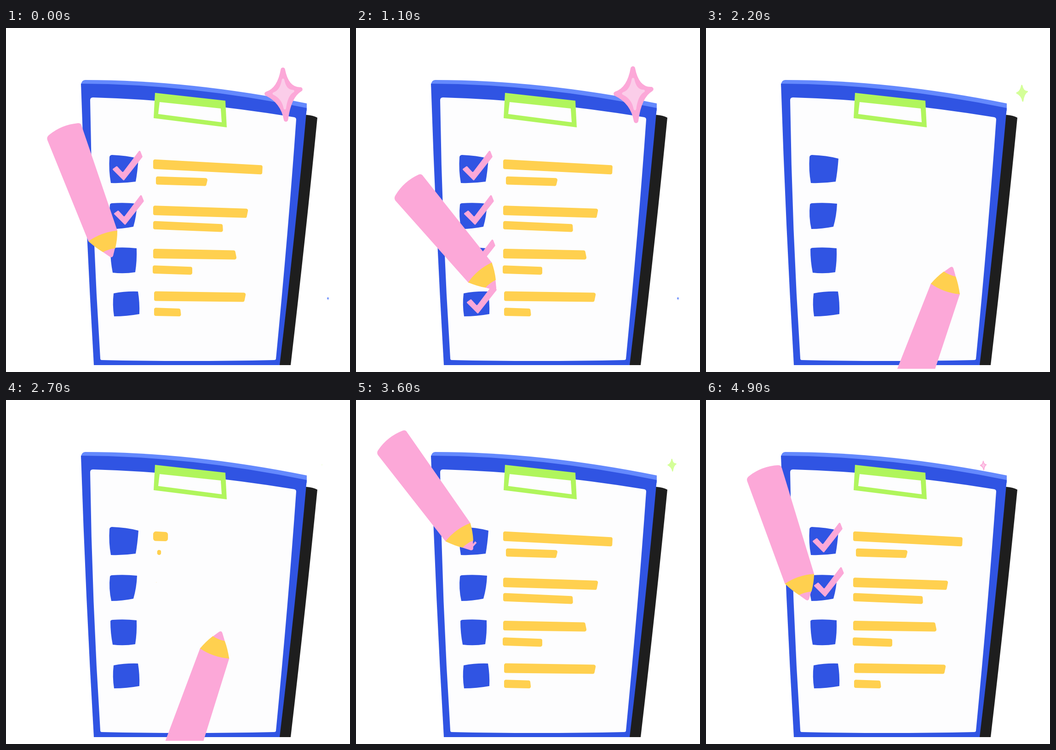
Animation, 748 px wide and 748 px high, one loop 5000 ms. Source, as an HTML page with a canvas:

```html
<!DOCTYPE html>
<html lang="en">
<head>
<meta charset="utf-8">
<title>Checklist</title>
<style>
html, body { margin: 0; width: 100%; height: 100%; overflow: hidden; background: #fff; }
canvas { display: block; width: 748px; height: 748px; }
</style>
</head>
<body>
<canvas id="stage" width="748" height="748"></canvas>
<script>
const ctx = document.getElementById('stage').getContext('2d');
const BLUE = '#3054e3', SKY = '#6489fd', PINK = '#fca8d8', PALE = '#fbcde9',
      YELLOW = '#ffd04f', LIME = '#b0f55c', MINT = '#d4ff98', INK = '#1e1e1e', PAPER = '#fdfdfe';
const LOOP = 5000, STEP = 100, ROWS = 4;

const clamp = u => Math.max(0, Math.min(1, u));
const mix = (a, b, u) => a + (b - a) * u;
const mixAll = (a, b, u) => a.map((v, i) => mix(v, b[i], u));
const smooth = u => (u = clamp(u), u * u * (3 - 2 * u));
const quint = u => u < 0.5 ? 16 * u ** 5 : 1 - 16 * (1 - u) ** 5;
const backIn = u => (u = clamp(u), u * u * (2.8 * u - 1.8));

function fill(d, color, rule) {
  ctx.fillStyle = color;
  ctx.fill(new Path2D(d), rule || 'nonzero');
}

function rounded(pts, r) {
  const p = new Path2D(), n = pts.length, last = pts[n - 1];
  p.moveTo((last[0] + pts[0][0]) / 2, (last[1] + pts[0][1]) / 2);
  pts.forEach((a, i) => p.arcTo(...a, ...pts[(i + 1) % n], r));
  p.closePath();
  return p;
}

function drawBoard() {
  fill('M640 187 L654 189 Q668 190 677 195 Q653 440 619 733 H580Z', INK);
  fill('M163 123 Q165 113 172 113 Q400 113 654 164 V180 L164 130Z', SKY);
  fill('M163 121 Q400 122 654 174 Q630 440 595 733 H191 Q173 427 163 121Z', BLUE);
  fill('M183 157 Q183 151 189 151 Q400 157 627 194 Q631 195 631 199 Q614 440 587 719 ' +
       'Q587 722 583 722 Q390 726 208 722 Q205 722 205 718 Q187 438 183 157Z', PAPER);
  fill('M324 141 L477 158 L480 216 L321 196Z', LIME);
  fill('M334 161 L331 187 L469 205 L467 175Z', PAPER);
}

function drawBoxes() {
  fill('M225 281 Q225 277 230 276 Q262 277 288 284 Q286 312 282 334 Q255 338 228 337 Q223 310 225 281Z' +
       'M226 384 Q227 381 231 381 Q258 379 285 382 Q284 408 277 432 Q252 437 229 437 Q223 410 226 384Z' +
       'M227 481 Q228 478 232 478 Q258 476 284 479 Q285 506 281 531 Q256 535 232 532 Q227 507 227 481Z' +
       'M234 577 Q260 572 287 573 Q291 597 290 622 Q262 627 235 627 Q231 602 234 577Z', BLUE);
}

// Bars: left, middle of the left side, width, fall to the right, slant of the end
const BARS = [
  [320, 296, 238, 13, -1], [326, 331.5, 113, 4, -4],
  [320, 396.5, 207, 7, -4], [320, 428.5, 151, 7, 1],
  [320, 490.5, 178, 3.5, 4], [319, 525, 86, 3.5, 0],
  [322, 583, 200, 3, -4], [322, 617, 57, 2, 2]
];

function drawBars(t) {
  ctx.fillStyle = YELLOW;
  BARS.forEach(([x, y, full, fall, slant], i) => {
    const row = i >> 1, lag = i % 2;
    const p = t >= 2.5 ? smooth((t - 2.55 - 0.13 * row - 0.04 * lag) / 0.65)
                       : 1 - smooth((t - 1.47 + 0.045 * row - 0.02 * lag) / 0.5);
    const w = full * p;
    if (w < 0.5) return;
    const h = (lag ? 9 : 10.5) * Math.min(1, w / 14), end = y + fall * p;
    const left = x + Math.max(0, 7 - w / 2), right = left + w;
    ctx.fill(rounded([[left, y - h], [right, end - h], [right + slant * p, end + h * 0.9], [left, y + h]],
      Math.min(mix(6, 4, p), w / 2.2, h)));
  });
}

const TICK = [[231, 308], [241, 301], [254, 315], [291, 266], [297, 281], [256, 333]];
const NIB_PATH = [[236, 308], [254, 327], [295, 275]];
const WRITE = 0.35, BEND = 0.29;
const tickStart = i => 3.5 + 0.9 * i - 0.05 * i * i;
const tickAt = i => [3 * i, 96.5 * i - 1];

function drawTicks(t) {
  const time = t < 2.5 ? t + 5 : t;
  for (let i = 0; i < ROWS; i++) {
    const p = clamp((time - tickStart(i)) / WRITE);
    const s = 1 - backIn((time - 6.694 + 0.105 * i) / 0.5);
    if (p <= 0 || s <= 0.01) continue;
    ctx.save();
    ctx.translate(...tickAt(i));
    ctx.translate(264, 300);
    ctx.scale(s, s);
    ctx.translate(-264, -300);
    ctx.clip(rounded(TICK, 2));
    ctx.strokeStyle = PINK;
    ctx.lineWidth = 30;
    ctx.setLineDash([p * 116, 300]);
    ctx.beginPath();
    ctx.moveTo(228, 300);
    ctx.lineTo(255, 325);
    ctx.lineTo(302, 262);
    ctx.stroke();
    ctx.restore();
  }
}

// Pencil poses are [x of the tip, y of the tip, degrees]
function writing(i, p) {
  const [a, b, c] = NIB_PATH, [dx, dy] = tickAt(i);
  const [x, y] = p < BEND ? mixAll(a, b, p / BEND) : mixAll(b, c, (p - BEND) / (1 - BEND));
  return [x + dx, y + dy, 50 + 7 * (1 - p) ** 2];
}

function moving(i, u) {
  const [x, y, angle] = mixAll(writing(i, 1), writing(i + 1, 0), quint(u));
  const lift = Math.sin(Math.PI * u);
  return [x - 48 * lift ** 4, y, angle + 18 * lift];
}

// The sweep back to the first row: time, then pose
const SWEEP = [
  [1.1, 304, 568, 50], [1.8, 547.5, 506, -43], [2.7, 467, 503, -71],
  [3, 448, 268, 30], [3.3, 245, 306, 68], [3.5, 236, 308, 57]
];

function sweeping(t) {
  const i = SWEEP.findIndex((k, n) => t < SWEEP[n + 1][0]);
  const key = n => SWEEP[Math.max(0, Math.min(SWEEP.length - 1, n))];
  const [a, b, c, d] = [key(i - 1), key(i), key(i + 1), key(i + 2)];
  const h = c[0] - b[0], u = (t - b[0]) / h, s = smooth(u);
  return [1, 2, 3].map(k => {
    const m0 = (c[k] - a[k]) / (c[0] - a[0]) * h, m1 = (d[k] - b[k]) / (d[0] - b[0]) * h;
    return mix(b[k], c[k], s) + u * (1 - u) * ((1 - u) * m0 - u * m1);
  });
}

function poseAt(t) {
  const time = t < 1.1 ? t + 5 : t;
  if (time < tickStart(0)) return sweeping(time);
  let i = ROWS - 1;
  while (time < tickStart(i)) i--;
  const d = time - tickStart(i);
  if (d <= WRITE || i === ROWS - 1) return writing(i, clamp(d / WRITE));
  return moving(i, (d - WRITE) / (tickStart(i + 1) - tickStart(i) - WRITE));
}

function drawPencil(t) {
  const [x, y, angle] = poseAt(t);
  ctx.save();
  ctx.beginPath();
  ctx.rect(0, 0, 748, 741);
  ctx.clip();
  ctx.translate(x, y);
  ctx.rotate(angle * Math.PI / 180);
  ctx.translate(-50, 3);
  fill('M0 -33.5 L34 -15.5 L45 -8 Q54 -3 47 2 L33 12 L0 33.5 L-238 40.5 ' +
       'Q-245 40 -247 32 Q-258 0 -249 -34 Q-247 -41 -240 -40Z', PINK);
  fill('M0 -33.5 Q18 -27 34.5 -16 Q31 -2 33 12 Q20 23 0 33.5 Q-9 0 0 -33.5Z', YELLOW);
  ctx.restore();
}

const STAR = new Path2D('M-1 -54 Q8 -8 39 -9 Q13 6 6 60 Q-1 19 -38 1 Q-9 -8 -1 -54Z');
const STARS = [
  { x: 603, y: 142, size: 1.04, color: PINK, core: PALE, starts: [-0.1, 0.98, 4.9] },
  { x: 687, y: 141, size: 0.465, color: MINT, starts: [2.16, 3.19, 4.22] },
  { x: 700, y: 588, size: 0.34, color: SKY, starts: [0, 1.1, 3.05, 4.2] }
];

// Fast swell, slower shrink
function popSize(d) {
  const u = (d + 0.004) / 0.554;
  return u > 0 && u < 1 ? Math.sin(Math.PI * u ** 0.6) : 0;
}

function drawStar(x, y, color, s) {
  ctx.save();
  ctx.translate(x, y);
  ctx.scale(s, s);
  ctx.fillStyle = ctx.strokeStyle = color;
  ctx.lineWidth = 10;
  ctx.lineJoin = 'round';
  ctx.fill(STAR);
  ctx.stroke(STAR);
  ctx.restore();
}

function drawStars(t) {
  STARS.forEach(({ x, y, size, color, core, starts }) => {
    const s = size * Math.max(...starts.map(a => popSize(t - a)));
    if (s <= 0) return;
    drawStar(x, y, color, s);
    if (core) drawStar(x, y, core, s * 0.57);
  });
}

function draw() {
  const t = Math.floor(performance.now() % LOOP / STEP) * STEP / 1000;
  ctx.fillStyle = '#fff';
  ctx.fillRect(0, 0, 748, 748);
  drawBoard();
  drawBoxes();
  drawBars(t);
  drawTicks(t);
  drawStars(t);
  drawPencil(t);
  requestAnimationFrame(draw);
}
draw();
</script>
</body>
</html>
```
